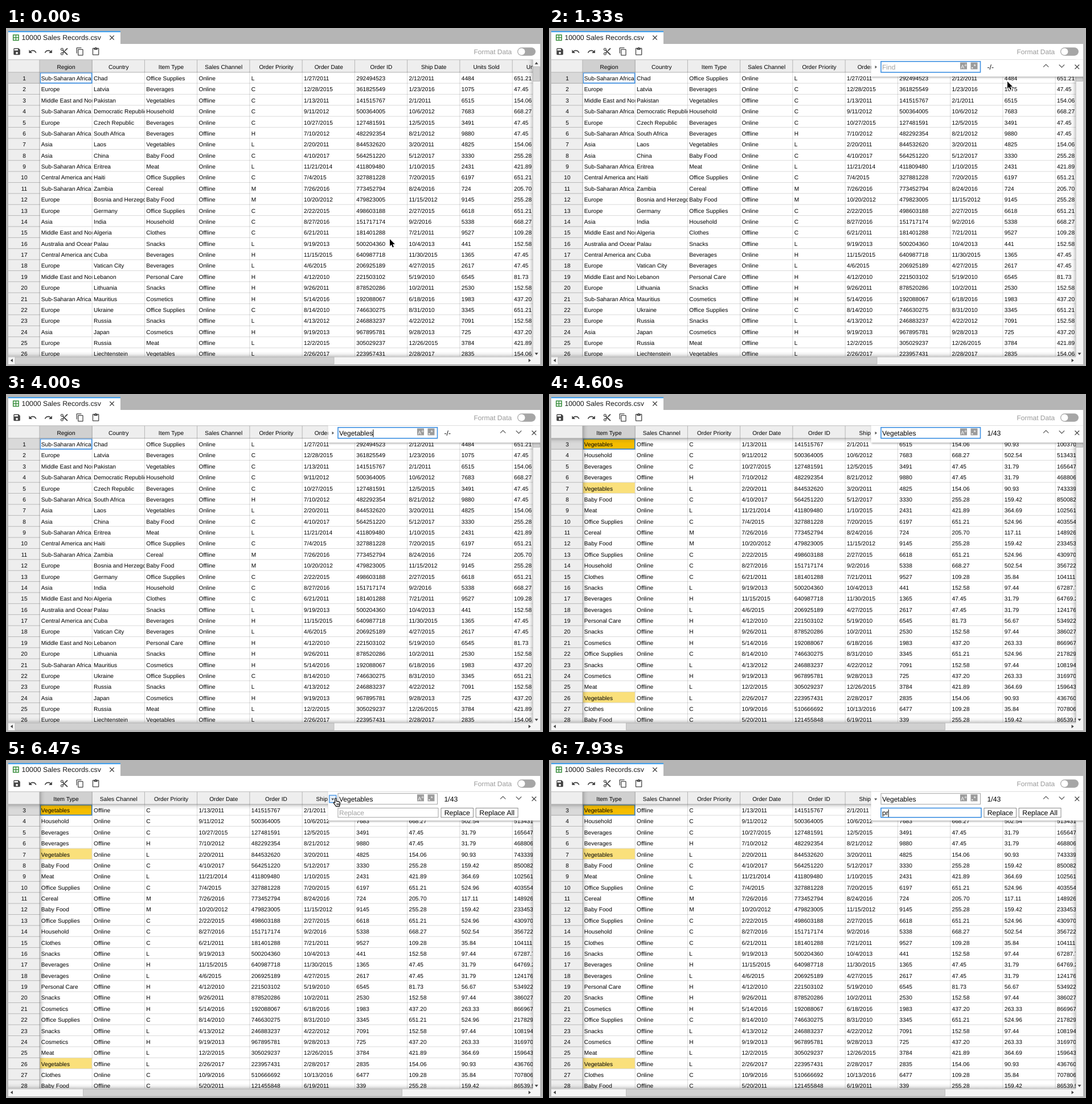
Animation, 943 px wide and 594 px high, one loop 8 s. Source, as an HTML page with a canvas:

```html
<!DOCTYPE html>
<html lang="en">
<head>
<meta charset="utf-8">
<title>Sales records</title>
<style>
html, body { margin: 0; width: 100%; height: 100%; overflow: hidden; background: #b5b5b5; }
canvas { display: block; }
</style>
</head>
<body>
<canvas id="stage" width="943" height="594"></canvas>
<script>
const ctx = document.getElementById('stage').getContext('2d');
ctx.textRendering = 'geometricPrecision';

const HEADS = ['Region', 'Country', 'Item Type', 'Sales Channel', 'Order Priority', 'Order Date', 'Order ID',
  'Ship Date', 'Units Sold', 'Unit Price', 'Unit Cost', 'Total Revenue'];
const REGIONS = { S: 'Sub-Saharan Africa', E: 'Europe', M: 'Middle East and North Africa', A: 'Asia',
  C: 'Central America and the Caribbean', O: 'Australia and Oceania' };
const PRICES = { 'Office Supplies': '651.21 524.96', Beverages: '47.45 31.79', Vegetables: '154.06 90.93',
  Household: '668.27 502.54', 'Baby Food': '255.28 159.42', Meat: '421.89 364.69', Cereal: '205.70 117.11',
  Clothes: '109.28 35.84', Snacks: '152.58 97.44', 'Personal Care': '81.73 56.67', Cosmetics: '437.20 263.33' };
const ROWS = `S,Chad,Office Supplies,Online,L,1/27/2011,292494523,2/12/2011,4484
E,Latvia,Beverages,Online,C,12/28/2015,361825549,1/23/2016,1075
M,Pakistan,Vegetables,Offline,C,1/13/2011,141515767,2/1/2011,6515
S,Democratic Republic of the Congo,Household,Online,C,9/11/2012,500364005,10/6/2012,7683
E,Czech Republic,Beverages,Online,C,10/27/2015,127481591,12/5/2015,3491
S,South Africa,Beverages,Offline,H,7/10/2012,482292354,8/21/2012,9880
A,Laos,Vegetables,Online,L,2/20/2011,844532620,3/20/2011,4825
A,China,Baby Food,Online,C,4/10/2017,564251220,5/12/2017,3330
S,Eritrea,Meat,Online,L,11/21/2014,411809480,1/10/2015,2431
C,Haiti,Office Supplies,Online,C,7/4/2015,327881228,7/20/2015,6197
S,Zambia,Cereal,Offline,M,7/26/2016,773452794,8/24/2016,724
E,Bosnia and Herzegovina,Baby Food,Offline,M,10/20/2012,479823005,11/15/2012,9145
E,Germany,Office Supplies,Online,C,2/22/2015,498603188,2/27/2015,6618
A,India,Household,Online,C,8/27/2016,151717174,9/2/2016,5338
M,Algeria,Clothes,Offline,C,6/21/2011,181401288,7/21/2011,9527
O,Palau,Snacks,Offline,L,9/19/2013,500204360,10/4/2013,441
C,Cuba,Beverages,Online,H,11/15/2015,640987718,11/30/2015,1365
E,Vatican City,Beverages,Online,L,4/6/2015,206925189,4/27/2015,2617
M,Lebanon,Personal Care,Offline,H,4/12/2010,221503102,5/19/2010,6545
E,Lithuania,Snacks,Offline,H,9/26/2011,878520286,10/2/2011,2530
S,Mauritius,Cosmetics,Offline,H,5/14/2016,192088067,6/18/2016,1983
E,Ukraine,Office Supplies,Online,C,8/14/2010,746630275,8/31/2010,3345
E,Russia,Snacks,Offline,L,4/13/2012,246883237,4/22/2012,7091
A,Japan,Cosmetics,Offline,H,9/19/2013,967895781,9/28/2013,725
E,Russia,Meat,Offline,L,12/2/2015,305029237,12/26/2015,3784
E,Liechtenstein,Vegetables,Offline,L,2/26/2017,223957431,2/28/2017,2835
,,Clothes,Online,C,10/9/2016,510666692,10/13/2016,6477
,,Baby Food,Offline,C,5/20/2011,121455848,6/19/2011,339`.split('\n').map(line => {
  const row = line.split(',');
  const [price, cost] = PRICES[row[2]].split(' ');
  row[0] = REGIONS[row[0]] || '';
  return [...row, price, cost, (row[8] * price).toFixed(2)];
});

// Toolbar icons on a 24-unit grid
const ICONS = [
  'M17 3H5c-1.11 0-2 .9-2 2v14c0 1.1.89 2 2 2h14c1.1 0 2-.9 2-2V7l-4-4zm-5 16c-1.66 0-3-1.34-3-3s1.34-3 3-3 3 1.34 3 3-1.34 3-3 3zm3-10H5V5h10v4z',
  'M12.5 8c-2.65 0-5.05.99-6.9 2.6L2 7v9h9l-3.62-3.62c1.39-1.16 3.16-1.88 5.12-1.88 3.54 0 6.55 2.31 7.6 5.5l2.37-.78C21.08 11.03 17.15 8 12.5 8z',
  'M18.4 10.6C16.55 8.99 14.15 8 11.5 8c-4.65 0-8.58 3.03-9.96 7.22L3.9 16c1.05-3.19 4.05-5.5 7.6-5.5 1.95 0 3.73.72 5.12 1.88L13 16h9V7l-3.6 3.6z',
  'M9.64 7.64c.23-.5.36-1.05.36-1.64 0-2.21-1.79-4-4-4S2 3.79 2 6s1.79 4 4 4c.59 0 1.14-.13 1.64-.36L10 12l-2.36 2.36C7.14 14.13 6.59 14 6 14c-2.21 0-4 1.79-4 4s1.79 4 4 4 4-1.79 4-4c0-.59-.13-1.14-.36-1.64L12 14l7 7h3v-1L9.64 7.64zM6 8c-1.1 0-2-.89-2-2s.9-2 2-2 2 .89 2 2-.9 2-2 2zm0 12c-1.1 0-2-.89-2-2s.9-2 2-2 2 .89 2 2-.9 2-2 2zM19 3l-6 6 2 2 7-7V3h-3z',
  'M16 1H4c-1.1 0-2 .9-2 2v14h2V3h12V1zm3 4H8c-1.1 0-2 .9-2 2v14c0 1.1.9 2 2 2h11c1.1 0 2-.9 2-2V7c0-1.1-.9-2-2-2zm0 16H8V7h11v14z',
  'M19 2h-4.18C14.4.84 13.3 0 12 0c-1.3 0-2.4.84-2.82 2H5c-1.1 0-2 .9-2 2v16c0 1.1.9 2 2 2h14c1.1 0 2-.9 2-2V4c0-1.1-.9-2-2-2zm-7 0c.55 0 1 .45 1 1s-.45 1-1 1-1-.45-1-1 .45-1 1-1zm7 18H5V4h2v3h10V4h2v16z'
].map(d => new Path2D(d));
const ARROW = new Path2D('M0 0V12.4L2.9 9.8 4.9 14.4 7 13.5 5 9H9z');
const HAND = new Path2D('M4 0C5 0 5.3.7 5.3 1.4V5.4L9.6 6.3C11 6.7 11.6 7.3 11.6 8.7L11 12.6 10.4 14.6H4.6C3.5 12 1.5 10.3.3 8.6-.1 7.6 1 6.8 1.9 7.5L2.7 8.2V1.4C2.7.6 3.2 0 4 0z');
const IBEAM = new Path2D('M-3-6.5Q0-6.5 0-4.5Q0-6.5 3-6.5M0-4.5V4.5M-3 6.5Q0 6.5 0 4.5Q0 6.5 3 6.5M-1.5 2H1.5');

const BLUE = '#3d8fe2';
const LEFT = 59.35, TOP = 78.2, RIGHT = 925, BOTTOM = 577.5, COL = 92.25, ROW = 19.3725, LINE = 0.92;
const PANEL_AT = 830, ENTER_AT = 4600, FOCUS_AT = 6330, EXPAND_AT = 6470, REPLACE_AT = 7030;
const FIND_KEYS = [1800, 2200, 2330, 2400, 2800, 3270, 3530, 3670, 3870, 3930];
const REPLACE_KEYS = [7670, 7870];
// Pointer stops: time, x, y
const STOPS = [[70, 674, 371], [870, 803, 88], [930, 805, 94], [4640, 805, 94], [5400, 650, 73], [5600, 650, 73],
  [5800, 600, 71], [6130, 577, 67], [6700, 577, 67], [7100, 612, 93]];

function rect(x, y, w, h, fill) {
  ctx.fillStyle = fill;
  ctx.fillRect(x, y, w, h);
}
function box(x, y, w, h, stroke, width = 1) {
  ctx.strokeStyle = stroke;
  ctx.lineWidth = width;
  ctx.strokeRect(x, y, w, h);
}
function text(str, x, y, size = 10.15, fill = '#000', align = 'left') {
  ctx.font = `${size}px "Liberation Sans", Arial, sans-serif`;
  ctx.fillStyle = fill;
  ctx.textAlign = align;
  ctx.fillText(str, x, y);
}
function poly(points, stroke, width) {
  ctx.beginPath();
  points.forEach(([x, y]) => ctx.lineTo(x, y));
  if (width) {
    ctx.strokeStyle = stroke;
    ctx.lineWidth = width;
    ctx.stroke();
  } else {
    ctx.fillStyle = stroke;
    ctx.fill();
  }
}
function cross(x, y, r) {
  poly([[x - r, y - r], [x + r, y + r]], '#444', 1.3);
  poly([[x - r, y + r], [x + r, y - r]], '#444', 1.3);
}
// Small triangle pointing along (dx, dy)
function tri(x, y, dx, dy, r, fill = '#444') {
  const w = r * 1.1;
  poly([[x + dx * r, y + dy * r], [x - dx * r * .5 - dy * w, y - dy * r * .5 + dx * w],
    [x - dx * r * .5 + dy * w, y - dy * r * .5 - dx * w]], fill);
}
function clipped(x, y, w, h, draw) {
  ctx.save();
  ctx.beginPath();
  ctx.rect(x, y, w, h);
  ctx.clip();
  draw();
  ctx.restore();
}
// Scroll shadow fading from (x, y) along (dx, dy)
function shade(x, y, dx, dy, area) {
  const g = ctx.createLinearGradient(x, y, x + dx * 9.2, y + dy * 9.2);
  g.addColorStop(0, 'rgba(0,0,0,.2)');
  g.addColorStop(.5, 'rgba(0,0,0,.05)');
  g.addColorStop(1, 'rgba(0,0,0,0)');
  rect(...area, g);
}

function drawFrame() {
  rect(0, 0, 943, 594, '#b5b5b5');
  rect(4, 6, 197, 23, '#fff');
  rect(4, 5.5, 197, 1.8, '#2196f3');
  rect(4, 28, 934, 27.5, '#fff');
  box(12.7, 12.2, 9.4, 9.4, '#388e3c', 1.5);
  rect(16.7, 12, 1.4, 10, '#388e3c');
  rect(12.5, 16.2, 10, 1.4, '#388e3c');
  text('10000 Sales Records.csv', 27.4, 21.3, 12.3, '#1a1a1a');
  cross(186, 17, 3.7);
  ICONS.forEach((icon, i) => {
    ctx.save();
    ctx.translate(11.4 + 27.7 * i, 33.7);
    ctx.scale(.64, .64);
    ctx.fillStyle = '#444';
    ctx.fill(icon);
    ctx.restore();
  });
  text('Format Data', 821.5, 46, 12, '#9a9a9a');
  ctx.beginPath();
  ctx.roundRect(898, 34.3, 32, 14.4, 7.2);
  ctx.fillStyle = '#a6a6a6';
  ctx.fill();
  ctx.beginPath();
  ctx.arc(905.3, 41.5, 6.1, 0, 7);
  ctx.fillStyle = '#fff';
  ctx.fill();
}

function drawGrid(found) {
  const skip = found ? 2 : 0, grid = 'rgba(20,20,20,.17)', headGrid = 'rgba(20,20,20,.27)';
  rect(LEFT, TOP, RIGHT - LEFT, BOTTOM - TOP, '#fff');
  clipped(LEFT, TOP, RIGHT - LEFT, BOTTOM - TOP, () => {
    for (let r = 0; r < 26; r++) for (let c = 0; c < 10; c++) {
      const str = ROWS[r + skip][c + skip], x = LEFT + c * COL, y = TOP + r * ROW;
      if (found && str === 'Vegetables') rect(x, y, COL - LINE, ROW - LINE, r ? '#fae07b' : '#f5bd00');
      clipped(x, y, COL, ROW, () => text(str, x + 2.5, y + 13.9));
    }
    for (let c = 1; c < 10; c++) rect(LEFT + c * COL - LINE, TOP, LINE, 520, grid);
    for (let r = 1; r < 27; r++) rect(LEFT, TOP + r * ROW - LINE, 870, LINE, grid);
    box(LEFT + .9, TOP + .7, COL - 1.8, ROW - 1.5, found ? '#3b80c0' : BLUE, 1.7);
  });
  clipped(4, 55.5, RIGHT - 4, BOTTOM - 55.5, () => {
    rect(4, 55.5, 925, TOP - 55.5, '#eee');
    rect(4, TOP, LEFT - 4, 500, '#eee');
    rect(LEFT, 55.5, COL, TOP - 55.5, '#d0d0d0');
    rect(4, TOP, LEFT - 4, ROW, '#d9d9d9');
    for (let c = 0; c < 10; c++) {
      text(HEADS[c + skip], LEFT + (c + .5) * COL, 72, 10.15, '#000', 'center');
      rect(LEFT + c * COL - LINE, 56, LINE, TOP - 56, headGrid);
    }
    for (let r = 0; r < 26; r++) {
      text(r + 1 + skip, 32, TOP + r * ROW + 13.9, 10.15, '#000', 'center');
      rect(4, TOP + (r + 1) * ROW - LINE, LEFT - 4, LINE, headGrid);
    }
    rect(4, TOP - LINE, 925, LINE, headGrid);
    rect(LEFT - LINE, TOP, LINE, 500, headGrid);
    rect(4, 55.2, 925, 1, '#aaa');
  });
  shade(RIGHT, 0, -1, 0, [RIGHT - 9.2, 56, 9.2, BOTTOM - 56]);
  shade(0, BOTTOM, 0, -1, [4, BOTTOM - 9.2, RIGHT - 4, 9.2]);
  if (found) {
    shade(LEFT, 0, 1, 0, [LEFT, 56, 9.2, BOTTOM - 56]);
    shade(0, TOP, 0, 1, [4, TOP, RIGHT - 4, 9.2]);
  }

  rect(RIGHT, 55.5, 13, 535.5, '#f5f5f5');
  rect(4, BOTTOM, 934, 13.5, '#f5f5f5');
  rect(RIGHT, 55.5, 1, 522, '#d5d5d5');
  rect(4, BOTTOM, RIGHT - 4, 1, '#bbb');
  rect(RIGHT + .5, 68, 12, 25.5, '#cfcfcf');
  box(RIGHT + .5, 68, 12, 25.5, '#b5b5b5', .8);
  const thumb = found ? 135.5 : 16;
  rect(thumb, 578.3, 560, 12, '#d0d0d0');
  box(thumb, 578.3, 560, 12, '#b5b5b5', .8);
  tri(931.5, 62.5, 0, -1, 2.7);
  tri(931.5, 572, 0, 1, 2.7);
  tri(10.5, 584.3, -1, 0, 2.7);
  tri(919, 584.3, 1, 0, 2.7);
}

function typed(word, keys, t) {
  return word.slice(0, keys.filter(k => t >= k).length);
}
function field(y, w, h, value, hint, focus, caret) {
  rect(582.5, y, w, h, '#fff');
  box(583, y + .5, w - 1, h - 1, focus ? BLUE : '#a0a0a0', focus ? 1.6 : 1);
  const base = y + h / 2 + 4.6;
  text(value || hint, 585, base, 12, value ? '#000' : '#a0a0a0');
  if (caret) rect(585 + (value ? ctx.measureText(value).width : 0), base - 10.5, 1, 13.5, '#000');
}
function button(label, x, w) {
  box(x, 84.5, w, 16.3, '#8a8a8a', 1);
  text(label, x + w / 2, 97.1, 12.3, '#000', 'center');
}

function drawPanel(t) {
  const open = t >= EXPAND_AT, inButton = t >= FOCUS_AT && t < REPLACE_AT;
  clipped(555, 55.5, 383, 70, () => {
    ctx.save();
    ctx.shadowColor = 'rgba(0,0,0,.35)';
    ctx.shadowBlur = 3;
    ctx.shadowOffsetY = 1;
    rect(565.5, 55, 380, open ? 51.5 : 30.5, '#fff');
    ctx.restore();
  });
  if (inButton) {
    rect(567.5, 62, 12.5, 13, '#e6f0fa');
    box(567.8, 62, 12, 12.8, BLUE, 1.3);
  }
  tri(573.7, 68.6, open ? 0 : 1, open ? 1 : 0, 2.3, '#555');
  const findCaret = t < 1330 || (t >= 1800 && t < ENTER_AT);
  field(58.3, 175.5, 20, typed('Vegetables', FIND_KEYS, t), 'Find', t < FOCUS_AT, findCaret);
  rect(722, 60.5, 12, 12, '#9b9b9b');
  rect(740.5, 60.5, 12, 12, '#9b9b9b');
  text('A', 723.3, 70.5, 9, '#fff');
  text('a', 729.4, 66.5, 6.5, '#fff');
  rect(742.3, 69, 2, 2, '#fff');
  text('*', 745.5, 71, 11, '#fff');
  text(t < ENTER_AT ? '-/-' : '1/43', 769.5, 73, 12.2);
  poly([[868, 68.7], [872.7, 64], [877.4, 68.7]], '#555', 1.1);
  poly([[895.7, 64.5], [900.4, 69.2], [905.1, 64.5]], '#555', 1.1);
  cross(927.3, 68.3, 3.8);
  if (!open) return;
  const focus = t >= REPLACE_AT;
  field(84, 177, 17.3, typed('pr', REPLACE_KEYS, t), 'Replace', focus, focus && (t < 7530 || t >= 7670));
  button('Replace', 764, 56.5);
  button('Replace All', 825.2, 73.8);
}

function drawPointer(t) {
  if ((t >= 1800 && t < 4640) || t >= 7670) return;
  const next = STOPS.findIndex(s => s[0] > t);
  const b = STOPS[next < 0 ? STOPS.length - 1 : next], a = STOPS[Math.max(next - 1, 0)];
  const p = next < 1 ? (next ? 1 : 0) : (t - a[0]) / (b[0] - a[0]);
  const e = p * p * (3 - 2 * p), x = a[1] + (b[1] - a[1]) * e, y = a[2] + (b[2] - a[2]) * e;
  ctx.save();
  ctx.lineJoin = 'round';
  if (t > ENTER_AT && x >= 583 && x < 721) {
    ctx.translate(x, y);
    for (const [color, width] of [['#fff', 2.4], ['#000', 1.1]]) {
      ctx.strokeStyle = color;
      ctx.lineWidth = width;
      ctx.stroke(IBEAM);
    }
  } else {
    const hand = t > ENTER_AT && x < 583;
    ctx.translate(hand ? x - 2 : x, y);
    ctx.strokeStyle = hand ? '#000' : '#fff';
    ctx.lineWidth = hand ? 1.2 : 1.8;
    ctx.fillStyle = hand ? '#fff' : '#000';
    if (hand) ctx.fill(HAND);
    ctx.stroke(hand ? HAND : ARROW);
    if (!hand) ctx.fill(ARROW);
    if (hand) for (const k of [5.6, 7.4, 9.2]) rect(k, 9, .9, 3.6, '#000');
  }
  ctx.restore();
}

function tick() {
  const t = performance.now() % 8000;
  drawFrame();
  drawGrid(t >= ENTER_AT);
  if (t >= PANEL_AT) drawPanel(t);
  drawPointer(t);
  requestAnimationFrame(tick);
}
tick();
</script>
</body>
</html>
```
